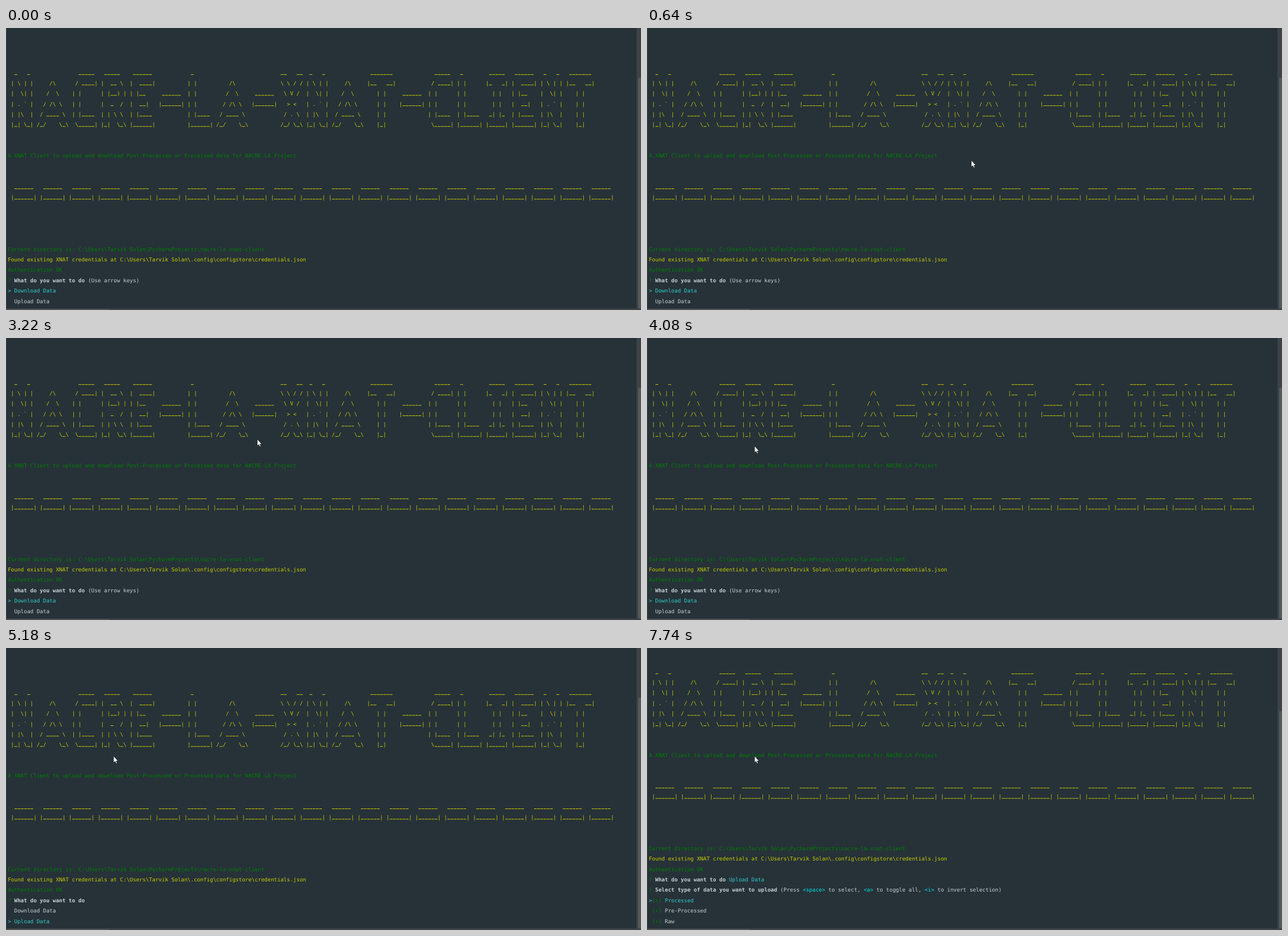
These frames come from a looping animation (1122x499 px, 8 s). An HTML page with a canvas:

```html
<!DOCTYPE html>
<html lang="en">
<head>
<meta charset="utf-8">
<title>Terminal session</title>
<style>
html, body { margin: 0; width: 100%; height: 100%; overflow: hidden; background: #263238; }
canvas { display: block; width: 100vw; height: 100vh; }
</style>
</head>
<body>
<canvas id="stage" width="1122" height="499"></canvas>
<script>
const ctx = document.getElementById('stage').getContext('2d');
const LOOP = 8000;
const COL = 5.667, ROW = 18.37, LEFT = 3.2, BASE = 82.4;
const FONT = '9.41px "DejaVu Sans Mono", monospace';
const C = {
  bg: '#263238', green: '#008000', yellow: '#cdcd00', text: '#c6d0d5',
  pick: '#30cccc', key: '#00e6e6', bar: '#3c4245', thumb: '#55595b', scroll: '#4a5053'
};

// Big letters; ~ stands for a backtick.
const GLYPHS = {
N: String.raw`
 _   _
| \ | |
|  \| |
| . ~ |
| |\  |
|_| \_|
`,
A: String.raw`

    /\
   /  \
  / /\ \
 / ____ \
/_/    \_\
`,
C: String.raw`
  _____
 / ____|
| |
| |
| |____
 \_____|
`,
R: String.raw`
 _____
|  __ \
| |__) |
|  _  /
| | \ \
|_|  \_\
`,
E: String.raw`
 ______
|  ____|
| |__
|  __|
| |____
|______|
`,
'-': String.raw`


 ______
|______|


`,
L: String.raw`
 _
| |
| |
| |
| |____
|______|
`,
X: String.raw`
__   __
\ \ / /
 \ V /
  > <
 / . \
/_/ \_\
`,
T: String.raw`
 _______
|__   __|
   | |
   | |
   | |
   |_|
`,
I: String.raw`
 _____
|_   _|
  | |
  | |
 _| |_
|_____|
`
};

function banner(word) {
  const rows = Array(6).fill('');
  for (const ch of word) {
    const lines = GLYPHS[ch].replace('~', '`').split('\n').slice(1, 7);
    const width = Math.max(...lines.map(l => l.length));
    lines.forEach((l, i) => { rows[i] += ' ' + l.padEnd(width); });
  }
  return rows;
}

const title = banner('NACRE-LA-XNAT-CLIENT');
const rule = ['  ______ ', ' |______|'].map(s => s.repeat(21));
const home = 'C:\\Users\\Tarvik Solan\\';

// Writes [text, colour, bold] parts on the character grid.
function write(row, ...parts) {
  const y = BASE + row * ROW;
  let col = 0;
  for (const [text, color, bold] of parts) {
    ctx.fillStyle = color;
    ctx.font = (bold ? 'bold ' : '') + FONT;
    for (const ch of text) {
      const x = LEFT + col++ * COL;
      if (ch === '_') ctx.fillRect(x + 0.35, y - 0.5, COL - 0.7, 1);
      else if (ch !== ' ') ctx.fillText(ch, x, y);
    }
  }
}

function drawFrame(scrolled) {
  ctx.fillStyle = C.bg;
  ctx.fillRect(0, 0, 1122, 499);
  ctx.fillStyle = C.bar;
  ctx.fillRect(0, 0, 1, 499);
  ctx.fillRect(1114, 0, 8, 499);
  ctx.fillRect(0, 496, 1122, 3);
  const top = scrolled ? 112 : 88;
  ctx.fillStyle = C.thumb;
  ctx.fillRect(1117, top, 5, 496 - top);
  ctx.fillStyle = C.scroll;
  ctx.fillRect(0, 497, 182, 2);
}

function drawTerminal(t) {
  const scrolled = t >= 6630;
  drawFrame(scrolled);
  const up = scrolled ? 2 : 0;
  const line = (row, ...parts) => write(row - up, ...parts);
  const ask = (row, text, ...rest) =>
    line(row, ['? ', C.green], [text + ' ', C.text, true], ...rest);

  title.forEach((s, i) => line(i, [s, C.yellow]));
  line(8, ['A XNAT Client to upload and download Post-Processed or Processed data for NACRE-LA Project', C.green]);
  rule.forEach((s, i) => line(11 + i, [s, C.yellow]));
  line(17, ['Current directory is: ' + home + 'PycharmProjects\\nacre-la-xnat-client', C.green]);
  line(18, ['Found existing XNAT credentials at ' + home + '.config\\configstore\\credentials.json', C.yellow]);
  line(19, ['Authentication OK', C.green]);

  const first = 'What do you want to do';
  if (!scrolled) {
    const chosen = t < 5180 ? 0 : 1;
    ask(20, first, [chosen ? '' : '(Use arrow keys)', C.text]);
    ['Download Data', 'Upload Data'].forEach((s, i) =>
      line(21 + i, [(i === chosen ? '> ' : '  ') + s, i === chosen ? C.pick : C.text]));
    return;
  }
  ask(20, first, ['Upload Data', C.pick]);
  ask(21, 'Select type of data you want to upload',
    ['(Press ', C.text], ['<space>', C.key], [' to select, ', C.text],
    ['<a>', C.key], [' to toggle all, ', C.text],
    ['<i>', C.key], [' to invert selection)', C.text]);
  const checked = t >= 7740;
  ['Processed', 'Pre-Processed', 'Raw'].forEach((s, i) => {
    const color = i ? C.text : C.pick;
    line(22 + i, [i ? ' ' : '>', color],
      [checked ? '(\u2217)' : '( )', checked ? C.green : color], [' ' + s, color]);
  });
}

// Pointer stops after the entry glide: [time, x, y].
const STOPS = [
  [640, 573, 234], [3220, 444, 179], [3250, 250, 91], [3290, 121, 130],
  [3570, 66, 150], [3610, 130, 174], [3650, 190, 191]
];

function pointerAt(t) {
  if (t < 190) return null;
  if (t < 640) {
    const p = Math.floor((t - 190) / 45) / 10;
    const left = (1 - p) ** 2;
    return [573 + 382 * left, 234 + 205 * left];
  }
  return STOPS.filter(s => s[0] <= t).pop().slice(1);
}

const arrow = new Path2D('M0 0V12L2.7 9.6L4.5 13.6L6.3 12.8L4.6 9H8Z');

function drawPointer(t) {
  const pos = pointerAt(t);
  if (!pos) return;
  ctx.save();
  ctx.translate(Math.round(pos[0]), Math.round(pos[1]));
  if (t >= 3950 && t < 4080) {
    ctx.fillStyle = 'rgba(255, 255, 0, 0.47)';
    ctx.beginPath();
    ctx.arc(-1, 0, 9, 0, Math.PI * 2);
    ctx.fill();
  }
  ctx.fillStyle = '#fff';
  ctx.strokeStyle = '#111';
  ctx.lineWidth = 0.7;
  ctx.fill(arrow);
  ctx.stroke(arrow);
  ctx.restore();
}

ctx.textRendering = 'geometricPrecision';
const start = performance.now();

function tick() {
  const t = (performance.now() - start) % LOOP;
  drawTerminal(t);
  drawPointer(t);
  requestAnimationFrame(tick);
}
tick();
</script>
</body>
</html>
```
